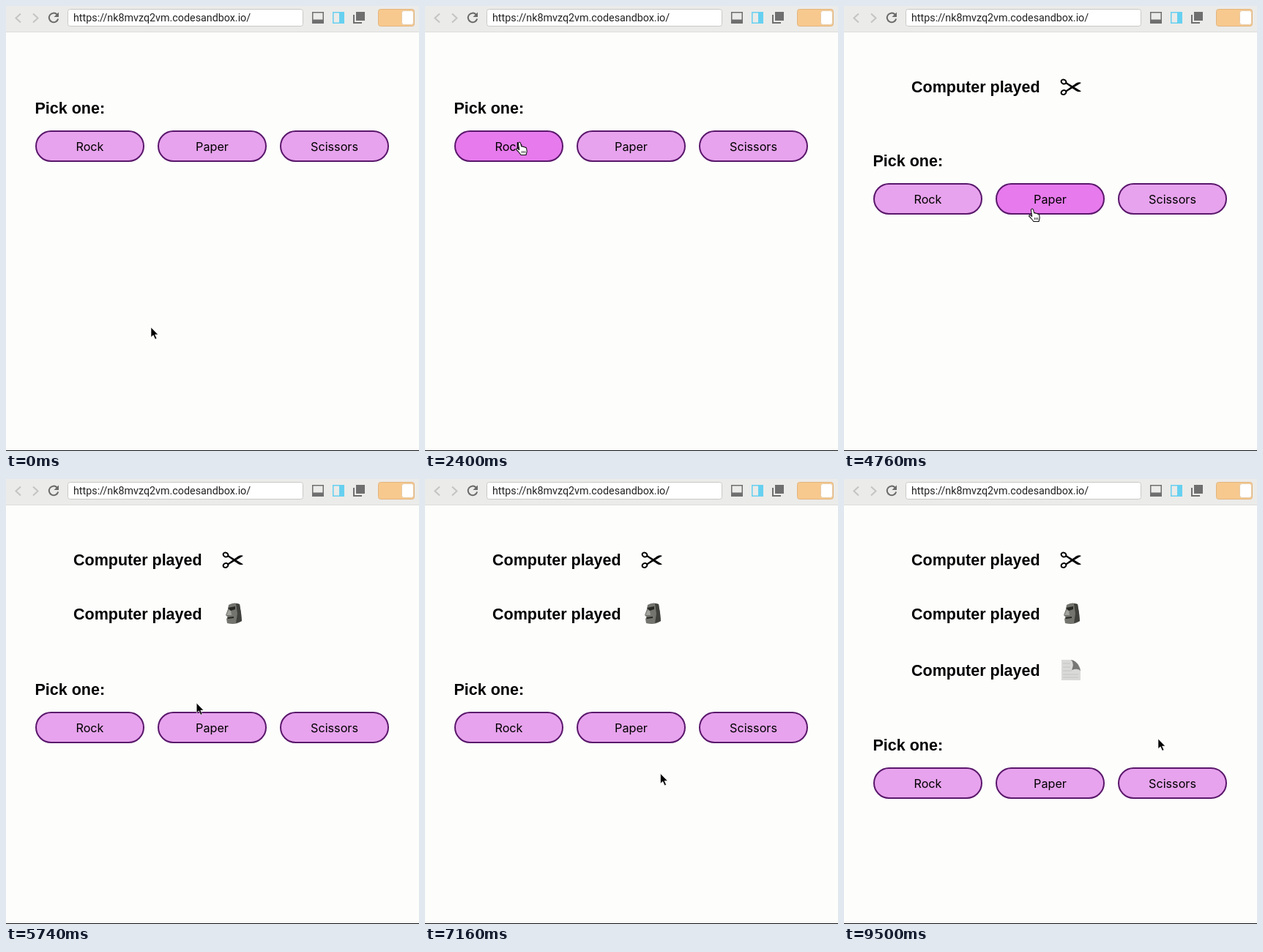
Recreate the animation shown at these times as an HTML page. Size 564x608 px, loop 9.6 s.

```html
<!DOCTYPE html>
<html lang="en">
<head>
<meta charset="utf-8">
<title>Rock, paper, scissors</title>
<style>
  html, body { margin: 0; width: 100%; height: 100%; overflow: hidden; background: #fdfdfc; }
  svg { display: block; width: 564px; height: 608px; }
  .heading { font: bold 21.5px "Liberation Sans", Arial, sans-serif; }
  .label { font: 16.2px Inter, sans-serif; text-anchor: middle; }
  .address { font: 14.3px Roboto, sans-serif; fill: #222; }
  .button { stroke: #5a176b; stroke-width: 2; }
  .hand { fill: #fff; stroke: #111; stroke-width: 1.1; stroke-linejoin: round; }
</style>
</head>
<body>
<svg viewBox="0 0 564 608">
  <!-- Browser bar -->
  <rect width="564" height="36" fill="#ebebe9"/>
  <path d="M0 35.5H564" stroke="#dededc"/>
  <g fill="none" stroke-width="2">
    <path d="M20 10.5 13.5 16.5 20 22.5M37 10.5 43.5 16.5 37 22.5" stroke="#c4c4c2"/>
    <path d="M69.6 11.5A6.3 6.3 0 1 0 71.2 17.5" stroke="#6a6a6a"/>
  </g>
  <path d="M72 8.5V15H65.5Z" fill="#6a6a6a"/>
  <rect x="84.5" y="4.5" width="321" height="23" rx="3" fill="#fff" stroke="#c9c9c7"/>
  <text class="address" x="92" y="21">https://nk8mvzq2vm.codesandbox.io/</text>
  <g fill="#6f6f6f">
    <path d="M418 8H434V24H418ZM419.5 9.5V18.5H432.5V9.5Z" fill-rule="evenodd"/>
    <path d="M446 8H462V24H446ZM447.5 9.5V22.5H455V9.5Z" fill="#66d0f0" fill-rule="evenodd"/>
    <path d="M478 8H490V20H478ZM474 12H476V22H486V24H474Z"/>
  </g>
  <rect x="508.5" y="4.5" width="49" height="23" rx="3" fill="#f7c98e" stroke="#e3b47c"/>
  <rect x="540.5" y="6.5" width="16" height="19" rx="3" fill="#fff" stroke="#e6cba8"/>

  <!-- Computer's moves -->
  <defs>
    <g id="blade">
      <ellipse cx="300" cy="103.500" rx="3.500" ry="2.800" transform="rotate(25 300 103.5)" fill="none" stroke="#000" stroke-width="2"/>
      <path d="M302 105.500 303.500 104 324 116.500Q321 118.300 317 116Z"/>
    </g>
  </defs>
  <g class="move">
    <text class="heading" x="92" y="118">Computer played</text>
    <use href="#blade"/>
    <use href="#blade" transform="matrix(1 0 0 -1 0 221.500)"/>
  </g>
  <g class="move">
    <text class="heading" x="92" y="192">Computer played</text>
    <path d="M304 172Q311 167.500 319 171L321 183 322 194Q314 200 302 197L301 191 303 189 300 186 303 178Z" fill="#74746f"/>
    <path d="M314 170 319 171 321 183 322 194 314 197 316 184Z" fill="#40403c"/>
    <path d="M303 176 313 174 313 178 307 180ZM302 189 311 188 311 190 303 191Z" fill="#272724"/>
    <path d="M304 179 307 180 308 186 301 186Z" fill="#a2a29d"/>
  </g>
  <g class="move">
    <text class="heading" x="92" y="269">Computer played</text>
    <path d="M297 247H311Q323 252 323 262V275H297Z" fill="#d9d9d8"/>
    <path d="M310 247Q320 249 323 262 319 258 311 261 315 252 310 247Z" fill="#777776"/>
    <path d="M299 252H309M299 257H309M299 262H311M299 267H320M299 271H320" stroke="#c4c4c3"/>
  </g>

  <g id="panel">
    <text class="heading" x="39.500" y="147">Pick one:</text>
  </g>
  <path d="M0 607.500H564" stroke="#111"/>

  <path id="arrow" d="M0 0V13.500L3.200 10.700 5.700 16.300 7.900 15.300 5.500 10H9.700Z" stroke="#fff" stroke-width=".6"/>
  <g id="hand" class="hand">
    <path d="M-1.600 1.500Q0-1.500 1.600 1.500L2.600 6Q4.300 5 5 6.500 6.600 5.800 7.400 7.200 9.200 6.800 9.600 8.500L10.200 12.500 9 17.500H2L-1.500 13-4.400 10.200Q-4.400 8.300-2.600 8.700L-.3 10.500Z"/>
    <path d="M3.500 12V15M5.500 12V15M7.500 12V15" fill="none" stroke-width=".8"/>
  </g>
</svg>
<script>
const LOOP = 9600;
const HOVER_LAG = 120, FADE = 120;
const BUTTON = { y: 170, width: 149, height: 43, spacing: 167 };

// The pointer glides between stops, resting at each until `leave`.
const STOPS = [
  { arrive: 0, x: 198, y: 439 },
  { arrive: 400, x: 115, y: 200 },
  { arrive: 1000, x: 443, y: 222 },
  { arrive: 1950, x: 129, y: 186, click: 2650, leave: 3000 },
  { arrive: 3940, x: 180, y: 351 },
  { arrive: 4400, x: 257, y: 277, click: 5250, leave: 5313 },
  { arrive: 6860, x: 274, y: 432 },
  { arrive: 7750, x: 453, y: 321, click: 8450, leave: 8550 },
  { arrive: 8900, x: 440, y: 432 },
  { arrive: 9300, x: 429, y: 355, leave: LOOP }
];

const byId = id => document.getElementById(id);
const panel = byId("panel"), arrow = byId("arrow"), hand = byId("hand");
const moves = document.querySelectorAll(".move");

function addToPanel(tag, attributes, text = "") {
  const node = document.createElementNS(panel.namespaceURI, tag);
  for (const key in attributes) node.setAttribute(key, attributes[key]);
  node.textContent = text;
  return panel.appendChild(node);
}

const buttons = ["Rock", "Paper", "Scissors"].map((name, i) => {
  const x = 40 + BUTTON.spacing * i;
  const shape = addToPanel("rect", {
    class: "button", x: x + 1, y: BUTTON.y + 1,
    width: BUTTON.width - 2, height: BUTTON.height - 2, rx: 20.5
  });
  addToPanel("text", { class: "label", x: x + BUTTON.width / 2, y: 197.5 }, name);
  return { x, shape };
});

const mix = (a, b, p) => a + (b - a) * p;
const ease = p => p * p * (3 - 2 * p);
const roundsPlayed = t => STOPS.filter(stop => t >= stop.click).length;
const panelShift = rounds => rounds && 76 * rounds - 4;

function pointerAt(t) {
  const from = STOPS.findLast(stop => stop.arrive <= t) ?? STOPS[0];
  const to = STOPS[STOPS.indexOf(from) + 1] ?? from;
  const leave = from.leave ?? from.arrive;
  if (t <= leave) return from;
  const p = ease((t - leave) / (to.arrive - leave));
  return { x: mix(from.x, to.x, p), y: mix(from.y, to.y, p) };
}

function hoveredAt(t) {
  const { x, y } = pointerAt(t);
  const top = BUTTON.y + panelShift(roundsPlayed(t));
  if (y < top || y > top + BUTTON.height) return -1;
  return buttons.findIndex(b => x >= b.x && x <= b.x + BUTTON.width);
}

// Averaging the recent hover state gives a linear fade.
function hoverAmount(index, t) {
  const samples = 12;
  let hits = 0;
  for (let i = 0; i < samples; i++) {
    if (hoveredAt(t - HOVER_LAG - FADE * i / samples) === index) hits++;
  }
  return hits / samples;
}

function draw(t) {
  const rounds = roundsPlayed(t);
  moves.forEach((move, i) => move.style.display = i < rounds ? "" : "none");
  panel.setAttribute("transform", `translate(0 ${panelShift(rounds)})`);

  buttons.forEach(({ shape }, i) => {
    const green = mix(163, 122, hoverAmount(i, t));
    shape.setAttribute("fill", `rgb(231 ${green} 237)`);
  });

  const pointing = hoveredAt(t) >= 0;
  arrow.style.display = pointing ? "none" : "";
  hand.style.display = pointing ? "" : "none";
  const { x, y } = pointerAt(t);
  (pointing ? hand : arrow).setAttribute("transform", `translate(${x} ${y})`);
}

const start = performance.now();
function tick() {
  draw((performance.now() - start) % LOOP);
  requestAnimationFrame(tick);
}
tick();
</script>
</body>
</html>
```
